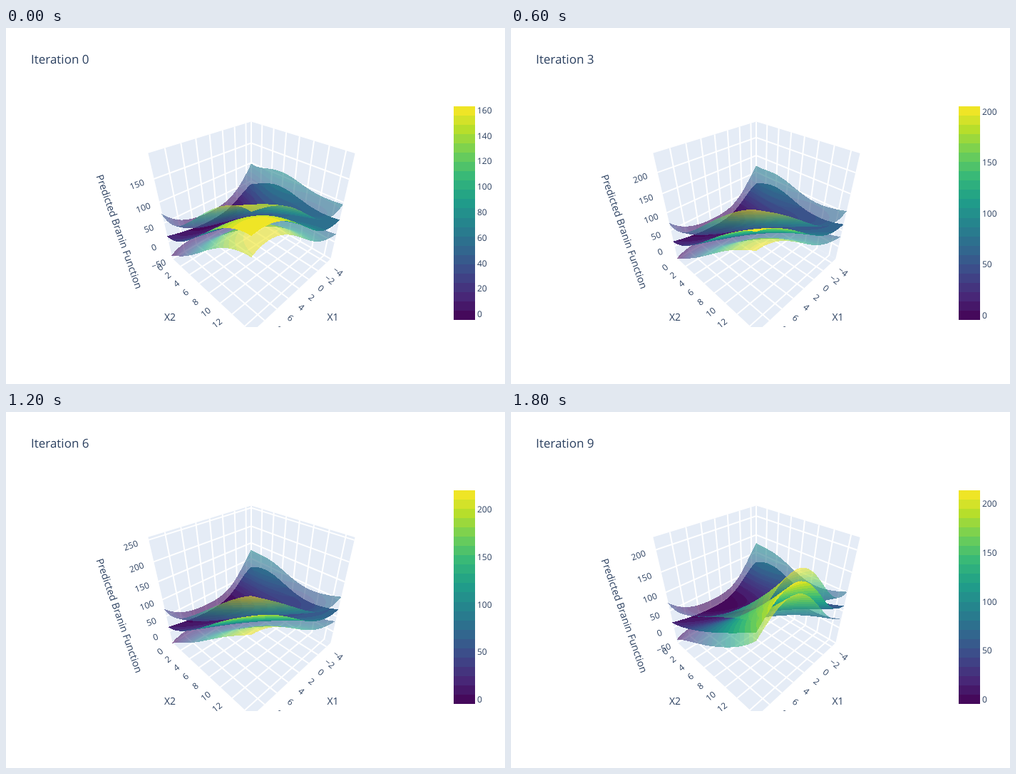
An HTML page with a canvas for the animation above (2000 ms loop, 700 by 500 pixels).

```html
<!DOCTYPE html>
<html lang="en">
<head>
<meta charset="utf-8">
<title>Surface iterations</title>
<style>
html, body { margin: 0; width: 100%; height: 100%; overflow: hidden; background: #fff; }
canvas { display: block; }
</style>
</head>
<body>
<canvas id="stage" width="700" height="500"></canvas>
<script>
const W = 700, H = 500, STEPS = 48, BANDS = 23, VEIL = 0.6, BAR_LOW = -4.5;
const ctx = document.getElementById('stage').getContext('2d', { willReadFrequently: true });
const lerp = (a, b, t) => a + (b - a) * t;

const viridis = ['440154', '482878', '3e4989', '31688e', '26828e', '1f9e89', '35b779', '6ece58', 'b5de2b', 'fde725']
  .map(hex => [0, 2, 4].map(i => parseInt(hex.slice(i, i + 2), 16)));
const palette = Array.from({ length: BANDS }, (_, i) => {
  const t = (i + 0.5) / BANDS * 9, k = Math.floor(t);
  return viridis[k].map((c, j) => Math.round(lerp(c, viridis[k + 1][j], t - k)));
});

// The predicted surface is a large front ridge plus a smaller hill at the back
const first = { peak: 158, centre: 0.85, width: 0.6, round: 1, hill: 50, hillY: 0.33 };
const grown = { peak: 206, centre: 1.05, width: 0.8, round: 0.3, hill: 68, hillY: 0.18 };
const final = { peak: 212, centre: 0.7, width: 0.5, round: 0, hill: 66, hillY: 0.18 };

function modelAt(iteration) {
  if (iteration > 6) return { ...final, low: -50, high: 244 - 2 * iteration, barHigh: 213.5, frontKnown: 20 };
  const growth = (iteration / 6) ** 0.43, model = {};
  for (const key in first) model[key] = lerp(first[key], grown[key], growth);
  return {
    ...model,
    low: iteration < 2 ? -50 : -47.7 + 7.7 * growth,
    high: 199.5 + 56.5 * growth,
    barHigh: 163 + 57 * growth,
    frontKnown: 0
  };
}

const bell = (t, centre, width) => Math.exp(-(((t - centre) / width) ** 2));

// x and y run from 0 to 1 along X1 and X2
function mean(m, x, y) {
  const rise = lerp(y ** (2.6 - 1.3 * x), y * y * (3 - 2 * y), m.round);
  return 20 * (2 * x - 1) ** 2 - 4
    + m.peak * bell(x, m.centre, m.width) * rise
    + m.hill * bell(x, 0, 0.25) * bell(y, m.hillY, 0.4)
    + 18 * ((1 - x) * y) ** 4;
}

// Uncertainty grows towards the edges, most at the back
function spread(m, x, y) {
  const ex = (2 * x - 1) ** 4, ey = (2 * y - 1) ** 4;
  return 15 + 22 * ex + ey * (10 + 10 * ex * (1 - 2 * y)) - m.frontKnown * (x * y) ** 6;
}

// Perspective camera at (1.25, 1.25, 1.25) looking at the unit cube's centre
function project(u, v, s) {
  const depth = 2.165 - (u + v + s) / Math.sqrt(3), f = 386.3 / depth;
  return { x: 344 + f * (v - u) / Math.SQRT2, y: 260 - f * (2 * s - u - v) / Math.sqrt(6), near: 1 / depth };
}

function buildMesh(m, sign, toS, range) {
  const points = [];
  for (let j = 0; j <= STEPS; j++) for (let i = 0; i <= STEPS; i++) {
    const x = i / STEPS, y = j / STEPS, z = mean(m, x, y) + sign * spread(m, x, y);
    points.push({ z, ...project(x - 0.5, y - 0.5, toS(z)) });
  }
  const heights = points.map(p => p.z);
  const [lo, hi] = range || [Math.min(...heights), Math.max(...heights)];
  for (const p of points) p.tone = (p.z - lo) / (hi - lo);
  return points;
}

function fillTriangle(px, zbuf, a, b, c, alpha) {
  const area = (b.x - a.x) * (c.y - a.y) - (c.x - a.x) * (b.y - a.y);
  if (!area) return;
  const x0 = Math.ceil(Math.min(a.x, b.x, c.x) - 0.5), x1 = Math.max(a.x, b.x, c.x) - 0.5;
  const y0 = Math.ceil(Math.min(a.y, b.y, c.y) - 0.5), y1 = Math.max(a.y, b.y, c.y) - 0.5;
  for (let y = y0; y <= y1; y++) for (let x = x0; x <= x1; x++) {
    const dx = x + 0.5 - a.x, dy = y + 0.5 - a.y;
    const p = (dx * (c.y - a.y) - (c.x - a.x) * dy) / area;
    const q = ((b.x - a.x) * dy - dx * (b.y - a.y)) / area;
    if (p < 0 || q < 0 || p + q > 1) continue;
    const blend = key => a[key] + p * (b[key] - a[key]) + q * (c[key] - a[key]);
    const near = blend('near'), k = y * W + x;
    if (near <= zbuf[k]) continue;
    if (alpha === 1) zbuf[k] = near;
    const rgb = palette[Math.max(0, Math.min(BANDS - 1, Math.floor(blend('tone') * BANDS)))];
    for (let n = 0; n < 3; n++) px[4 * k + n] = lerp(px[4 * k + n], rgb[n], alpha);
  }
}

function drawMesh(px, zbuf, mesh, alpha) {
  for (let j = 0; j < STEPS; j++) for (let i = 0; i < STEPS; i++) {
    const k = j * (STEPS + 1) + i, far = k + STEPS + 1;
    fillTriangle(px, zbuf, mesh[k], mesh[k + 1], mesh[far], alpha);
    fillTriangle(px, zbuf, mesh[k + 1], mesh[far + 1], mesh[far], alpha);
  }
}

function path(...points) {
  ctx.beginPath();
  for (const point of points) { const { x, y } = project(...point); ctx.lineTo(x, y); }
}
function gridLine(...points) { path(...points); ctx.stroke(); }

function label(text, x, y, size = 12, degrees = 0, align = 'center') {
  ctx.save();
  ctx.translate(x, y);
  ctx.rotate(degrees * Math.PI / 180);
  ctx.font = `${size}px "Open Sans", sans-serif`;
  ctx.textRendering = 'geometricPrecision';
  ctx.textAlign = align;
  ctx.fillStyle = '#2a3f5f';
  ctx.fillText(String(text).replace('-', '\u2212'), 0, size * 0.36);
  ctx.restore();
}

function ticks(lo, hi, step) {
  const list = [];
  for (let z = Math.ceil(lo / step) * step; z <= hi; z += step) list.push(z);
  return list;
}

function drawBox(zTicks, toS) {
  const m = -0.5, M = 0.5;
  ctx.fillStyle = '#e5ecf6';
  path([m, m, m], [M, m, m], [M, M, m], [m, M, m]); ctx.fill();
  path([m, m, m], [M, m, m], [M, m, M], [m, m, M]); ctx.fill();
  path([m, m, m], [m, M, m], [m, M, M], [m, m, M]); ctx.fill();
  ctx.strokeStyle = '#fff';
  ctx.lineWidth = 2;
  for (const t of ticks(-5, 10, 2)) { const u = t / 15 - 1 / 6; gridLine([u, M, m], [u, m, m], [u, m, M]); }
  for (const t of ticks(0, 15, 2)) { const v = t / 15 - 0.5; gridLine([M, v, m], [m, v, m], [m, v, M]); }
  for (const z of zTicks) { const s = toS(z); gridLine([M, m, s], [m, m, s], [m, M, s]); }
}

function drawAxisLabels(zTicks, toS) {
  for (const z of zTicks) {
    const p = project(0.5, -0.5, toS(z));
    label(z, p.x - 46 * p.near, p.y + 7.5, 12, -20);
  }
  for (const t of ticks(0, 15, 2)) {
    const p = project(0.5, t / 15 - 0.5, -0.5);
    label(t, p.x - 41 * p.near, p.y + 12, 12, -38);
  }
  for (const t of ticks(-5, 9, 2)) {
    const p = project(t / 15 - 1 / 6, 0.5, -0.5);
    label(t, p.x + 39 * p.near, p.y + 12.5, 12, 38);
  }
  label('X1', 458.5, 406, 14);
  label('X2', 230, 406, 14);
  label('Predicted Branin Function', 159, 286, 14, 70.7);
}

function drawColorBar(top) {
  palette.forEach((rgb, i) => {
    const y = Math.round(410 - (i + 1) * 300 / BANDS);
    ctx.fillStyle = `rgb(${rgb})`;
    ctx.fillRect(628, y, 30, Math.round(410 - i * 300 / BANDS) - y);
  });
  for (const z of ticks(0, top, top < 170 ? 20 : 50))
    label(z, 661, 410 - (z - BAR_LOW) * 300 / (top - BAR_LOW), 12, 0, 'left');
}

function draw(iteration) {
  const m = modelAt(iteration);
  const toS = z => (z - m.low) / (m.high - m.low) - 0.5;
  const zTicks = ticks(m.low, m.high, 50);

  ctx.fillStyle = '#fff';
  ctx.fillRect(0, 0, W, H);
  ctx.save();
  ctx.beginPath();
  ctx.rect(80, 100, 528, 320);
  ctx.clip();
  drawBox(zTicks, toS);

  const image = ctx.getImageData(0, 0, W, H), zbuf = new Float32Array(W * H);
  drawMesh(image.data, zbuf, buildMesh(m, 0, toS, [BAR_LOW, m.barHigh]), 1);
  drawMesh(image.data, zbuf, buildMesh(m, -1, toS), VEIL);
  drawMesh(image.data, zbuf, buildMesh(m, 1, toS), VEIL);
  ctx.putImageData(image, 0, 0);

  drawAxisLabels(zTicks, toS);
  ctx.restore();
  drawColorBar(m.barHigh);
  label('Iteration ' + iteration, 35, 44, 17, 0, 'left');
}

let shown = -1;
function tick() {
  const iteration = Math.floor(performance.now() % 2000 / 200);
  if (iteration !== shown) draw(shown = iteration);
  requestAnimationFrame(tick);
}
tick();
</script>
</body>
</html>
```
